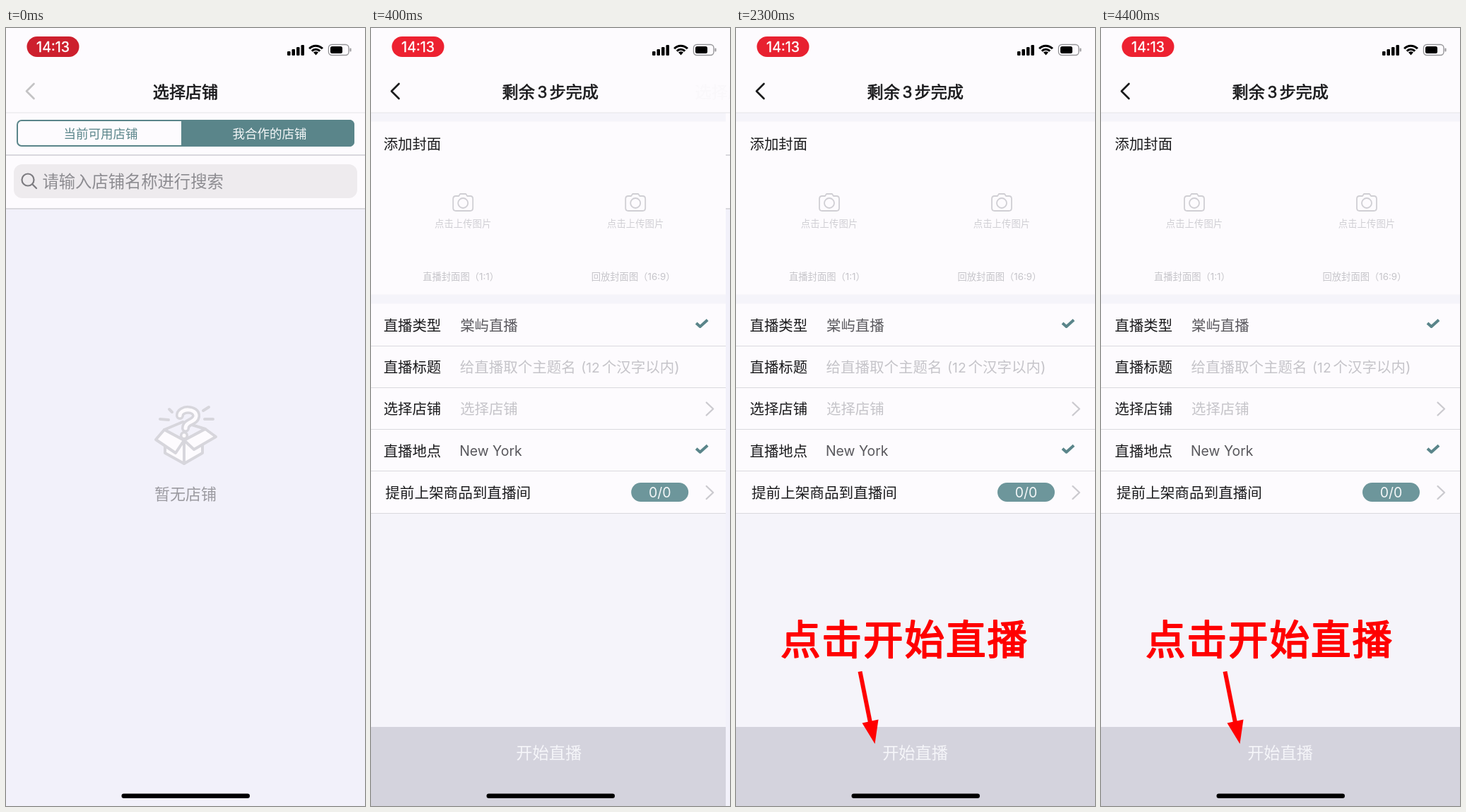
An HTML page with a canvas that plays this animation: 508x1102 px, repeating every 4.5 s.

```html
<!DOCTYPE html>
<html lang="zh-CN">
<head>
<meta charset="utf-8">
<style>
  html, body { margin: 0; width: 100%; height: 100%; overflow: hidden; background: #f5f4fa; }
  canvas { display: block; }
</style>
</head>
<body>
<canvas id="stage" width="508" height="1102"></canvas>
<script>
const W = 508, H = 1102, LOOP = 4500, STEP = 100;
const c = document.getElementById('stage').getContext('2d');
const FONT = 'Inter, "Noto Sans CJK SC", "Noto Sans CJK", sans-serif';
const PAPER = '#fdfbfe', TEAL = '#5a858a', GREY = '#c5c4c9', INK = '#1a1a1c';

const clamp = v => Math.max(0, Math.min(1, v));

// "bold" is an outline width in em, for a weight between regular and bold.
function text(str, x, cy, size, color, { bold = 0, align = 'left', spacing = 0 } = {}) {
  c.font = `400 ${size}px ${FONT}`;
  c.letterSpacing = `${spacing}px`;
  c.textAlign = align;
  c.fillStyle = c.strokeStyle = color;
  c.fillText(str, x, cy + size * 0.38);
  if (bold) {
    c.lineWidth = size * bold;
    c.strokeText(str, x, cy + size * 0.38);
  }
}

function rect(x, y, w, h, color) {
  c.fillStyle = color;
  c.fillRect(x, y, w, h);
}

function round(x, y, w, h, r, fill, stroke, width = 2) {
  c.beginPath();
  c.roundRect(x, y, w, h, r);
  if (fill) { c.fillStyle = fill; c.fill(); }
  if (stroke) { c.strokeStyle = stroke; c.lineWidth = width; c.stroke(); }
}

function path(d, stroke, width, fill) {
  const p = new Path2D(d);
  if (fill) { c.fillStyle = fill; c.fill(p); }
  if (stroke) { c.strokeStyle = stroke; c.lineWidth = width; c.stroke(p); }
}

function faded(alpha, draw) {
  c.save();
  c.globalAlpha = clamp(alpha);
  draw();
  c.restore();
}

function emptyBox() {
  const line = '#d7d6dc';
  path('M225 590V602L252 617L278 602V588L252 576Z', line, 4, PAPER);
  path('M224 569L250 558L282 568L252 584Z', line, 4, '#f2f1fa');
  path('M252 584V617', line, 4);
  path('M224 569L252 584L240 602L212 583Z', line, 4, PAPER);
  path('M282 568L252 584L266 597L297 579Z', line, 4, PAPER);
  const mark = 'M246 549C246 538 270 538 269 550C268 559 254 557 254 567M252 577V577.5';
  path(mark, line, 12);
  path(mark, PAPER, 5);
  path('M218 554L230 555M231 540L235 544M279 542L287 537M281 554H293', line, 4);
}

function shopPage() {
  rect(0, 120, W, H, '#f2f1fa');
  rect(0, 120, W, 136, PAPER);
  rect(0, 179, W, 2, '#d9d8de');
  rect(0, 255, W, 2, '#d9d8de');
  round(16, 131, 476, 36, 6, PAPER, TEAL);
  round(248, 130, 245, 38, [0, 7, 7, 0], TEAL);
  text('当前可用店铺', 134, 149.5, 17.5, TEAL, { align: 'center' });
  text('我合作的店铺', 373, 149.5, 17.5, '#f4f7f8', { align: 'center' });
  round(11, 193, 486, 48, 12, '#eeebee');
  path('M39.5 215A8.5 8.5 0 1 1 22.5 215A8.5 8.5 0 1 1 39.5 215M37 221L43 227', '#7c7b80', 2.2);
  text('请输入店铺名称进行搜索', 51.5, 217, 23.3, '#8d8c91');
  emptyBox();
  text('暂无店铺', 254, 660, 22, '#9b9aa0', { align: 'center' });
}

function cover(x, label, labelX, boxAlpha) {
  faded(boxAlpha, () => rect(x - 102, 190, 204, 135, '#f6f5f9'));
  path(`M${x - 10} 238H${x - 6}L${x - 4} 235H${x + 4}L${x + 6} 238H${x + 10}Q${x + 14} 238 ${x + 14} 242V255
    Q${x + 14} 259 ${x + 10} 259H${x - 10}Q${x - 14} 259 ${x - 14} 255V242Q${x - 14} 238 ${x - 10} 238Z`, '#d0cfd4', 1.8);
  c.beginPath();
  c.arc(x, 248, 7, 0, 7);
  c.stroke();
  text('点击上传图片', x, 277, 13.4, '#d0cfd4', { align: 'center' });
  text(label, labelX, 352, 13.3, GREY);
}

function formPage(p) {
  rect(0, 120, W, H, '#f5f4fa');
  rect(0, 132.5, W, 245, PAPER);
  rect(0, 390.5, W, 297, PAPER);
  text('添加封面', 19.5, 164, 20.4, INK);
  cover(132, '直播封面图（1:1）', 75, 1.5 * (1 - p));
  cover(376, '回放封面图（16:9）', 313.5, 1.5 * (1 - p));

  const rowY = i => 421 + 59.25 * i;
  const check = y => {
    c.lineCap = 'butt';
    path(`M462 ${y - 3}L467.5 ${y + 2}L478 ${y - 7.5}`, TEAL, 4);
    c.lineCap = 'round';
  };
  const chevron = y => path(`M476.5 ${y - 9}L486 ${y}L476.5 ${y + 9}`, '#cbcacf', 2.3);
  ['直播类型', '直播标题', '选择店铺', '直播地点'].forEach((s, i) => text(s, 19.5, rowY(i), 20.4, INK));
  for (let i = 0; i < 5; i++) rect(0, Math.round(449.5 + 59.25 * i), W, 1, '#dad9de');
  text('棠屿直播', 128, rowY(0), 20.4, '#58575c');
  text('给直播取个主题名', 127.5, rowY(1), 20.5, GREY);
  text('(12', 299, rowY(1), 19.3, GREY);
  text('个汉字以内)', 328.5, rowY(1), 20.5, GREY);
  text('选择店铺', 128, rowY(2), 20.4, GREY);
  text('New York', 127, rowY(3), 19.4, '#58575c');
  text('提前上架商品到直播间', 22, rowY(4), 20.6, INK);
  check(rowY(0));
  check(rowY(3));
  chevron(rowY(2));
  chevron(rowY(4));
  round(370, 644, 81, 27, 13.5, '#6d969b');
  text('0/0', 410.5, 657.5, 19.5, '#f4f7f8', { align: 'center' });
  rect(0, 990, W, 112, '#d4d3dd');
  text('开始直播', 253.5, 1026, 23.2, '#f5f5f9', { align: 'center' });
}

function statusBar(t) {
  // Recording pill: dims for part of every two seconds.
  const phase = t % 2000;
  const glow = phase < 1000 ? clamp((phase - 50) / 300) : clamp((1700 - phase) / 400);
  round(29.5, 12, 74, 29, 14.5, `rgb(${205 + 32 * glow}, ${31 + 2 * glow}, ${45 + 3 * glow})`);
  text('14:13', 66.5, 26.5, 19.8, '#fff', { bold: 0.02, align: 'center' });
  for (let i = 0; i < 4; i++) round(398 + 6.5 * i, 33 - 3 * i, 4.5, 6 + 3 * i, 1.2, '#000');
  c.lineCap = 'butt';
  c.strokeStyle = '#000';
  c.lineWidth = 3;
  for (const r of [7.8, 12.8]) {
    c.beginPath();
    c.arc(438.5, 38, r, -Math.PI * 0.76, -Math.PI * 0.24);
    c.stroke();
  }
  c.lineCap = 'round';
  path('M438.5 38.5L435 34.5Q438.5 32 442 34.5Z', null, 0, '#000');
  round(456.5, 23.5, 28.5, 15, 4.5, null, '#97969a', 1.4);
  round(459, 26, 17, 10, 2.5, '#000');
  round(486.5, 28.5, 2, 5, 1, '#97969a');
}

function navBar(p) {
  const bold = 0.03;
  rect(0, 0, W, 120, PAPER);
  rect(0, 119.5, W, 1, '#e6e5ea');
  faded(0.25 + 0.75 * p, () => path('M39.5 79L29 89.5L39.5 100', INK, 2.6));
  faded(1 - p, () => text('选择店铺', 254 + p * W / 2, 90, 23.1, INK, { bold, align: 'center' }));
  faded(p, () => {
    text('剩余', 185.5, 90, 23.2, INK, { bold });
    text('3', 242.5, 90, 22.5, INK, { bold, align: 'center' });
    text('步完成', 252.5, 90, 23.2, INK, { bold });
  });
}

function toast(t) {
  const alpha = Math.min(clamp((t - 2400) / 200), clamp((4200 - t) / 200));
  faded(alpha, () => {
    round(174, 524.5, 160, 53, 6, '#e9e6ea');
    text('请先选择店铺', 254, 551, 22, '#343338', { bold: 0.025, align: 'center' });
  });
}

function notes(t) {
  if (t >= 800) text('点击开始直播', 63, 866, 56.5, '#f00', { bold: 0.035, spacing: 2 });
  if (t >= 1500) {
    c.lineCap = 'butt';
    path('M175.5 911.5L190 984', '#f00', 6);
    c.lineCap = 'round';
    path('M178.5 984.5L201.5 979.5L196.5 1014Z', null, 0, '#f00');
  }
}

// Critically damped spring for the pop transition.
function popProgress(t) {
  const s = Math.max(0, t - 82) / 50;
  return t >= 600 ? 1 : 1 - (1 + s) * Math.exp(-s);
}

function draw(t) {
  const p = popProgress(t), x = Math.round(p * W);
  c.lineCap = c.lineJoin = 'round';
  if (p > 0) {
    c.save();
    c.translate(-0.3 * (W - x), 0);
    formPage(p);
    c.restore();
    rect(0, 120, W, H, `rgba(0, 0, 0, ${0.1 * (1 - p)})`);
  }
  if (p < 1) {
    const shade = c.createLinearGradient(x - 8, 0, x, 0);
    shade.addColorStop(0, 'rgba(0, 0, 0, 0)');
    shade.addColorStop(1, `rgba(0, 0, 0, ${0.12 * (1 - p)})`);
    rect(x - 8, 120, 8, H, shade);
    c.save();
    c.translate(x, 0);
    shopPage();
    c.restore();
  }
  navBar(p);
  statusBar(t);
  toast(t);
  notes(t);
  round(163.5, 1084.5, 181.5, 6.5, 3.25, '#000');
}

const start = performance.now();
function tick() {
  const t = (performance.now() - start) % LOOP;
  draw(Math.floor(t / STEP) * STEP);
  requestAnimationFrame(tick);
}
tick();
</script>
</body>
</html>
```
